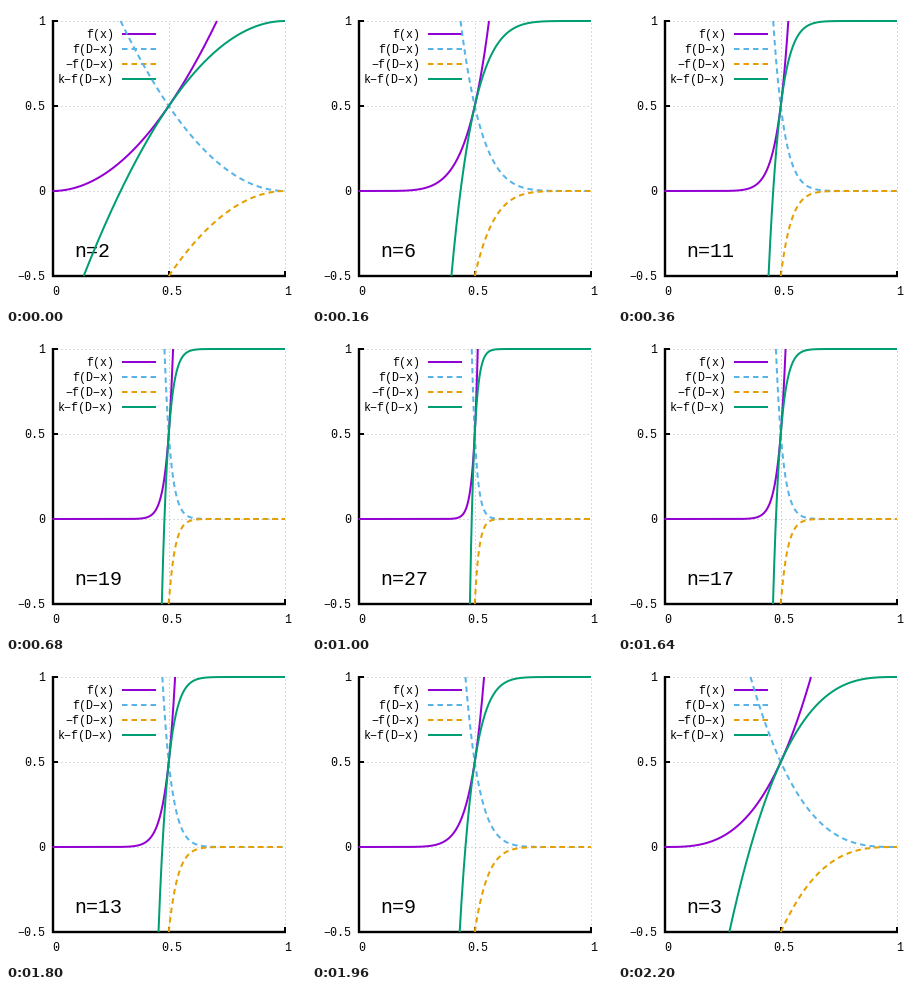
Animation, 300 px wide and 300 px high, one loop 2.24 s. Source, as a matplotlib script:

```python
import numpy as np
import matplotlib.pyplot as plt
from matplotlib.animation import FuncAnimation

SIZE, DPI = 300, 100
PX = 72 / DPI                      # one pixel in points
LEFT, RIGHT, TOP, BOTTOM = 46.5, 279, 15, 270
N_MIN, N_MAX = 2, 30
FRAMES = 2 * (N_MAX - N_MIN)
DASH = (0, (2.75, 2))
MINUS = "\u2212"

plt.rcParams["font.family"] = "Liberation Mono"
fig = plt.figure(figsize=(SIZE / DPI, SIZE / DPI), dpi=DPI, facecolor="white")
page = fig.add_axes([0, 0, 1, 1])
page.set(xlim=(0, SIZE), ylim=(SIZE, 0))
page.axis("off")


def to_px(x, y):
    return LEFT + x * (RIGHT - LEFT), BOTTOM - (y + 0.5) / 1.5 * (BOTTOM - TOP)


def line(xs, ys, color="black", width=2, **kw):
    return page.plot(xs, ys, color=color, lw=width * PX,
                     solid_capstyle="butt", **kw)[0]


def label(x, y, text, ha, size=11.67):
    return page.text(x, y, text.replace("-", MINUS), ha=ha, va="baseline",
                     fontsize=size * PX)


# grid, ticks and tick labels
grid = dict(color="#b4b4b4", width=1, ls=(0, (1, 3)), zorder=0)
for v in (0, 0.5, 1):
    x, _ = to_px(v, 0)
    if v:
        line([x, x], [BOTTOM, TOP], **grid)
    line([x, x], [BOTTOM, BOTTOM - 5.5])
    label(x + 3, 289, f"{v:g}", "center")
for v in (-0.5, 0, 0.5, 1):
    _, y = to_px(0, v)
    if v > -0.5:
        line([LEFT, RIGHT], [y, y], **grid)
    line([LEFT, LEFT + 5.5], [y, y])
    label(39, y + 4, f"{v:g}", "right")
line([LEFT, LEFT, RIGHT + 1], [TOP - 1, BOTTOM, BOTTOM], width=2.4,
     solid_joinstyle="miter")

# curves and their key
styles = [("f(x)", "#9400d3", "-"), ("f(D-x)", "#56b4e9", DASH),
          ("-f(D-x)", "#e69f00", DASH), ("k-f(D-x)", "#009e73", "-")]
curves = []
for i, (name, color, ls) in enumerate(styles):
    y = 28 + 15 * i
    label(108, y + 4, name, "right")
    line([116, 150], [y, y], color, ls=ls)
    curves.append(line([], [], color, ls=ls, zorder=3 + i))
caption = label(68.5, 251, "", "left", 20)


def draw(i):
    n = N_MIN + i if i <= FRAMES // 2 else N_MIN + FRAMES - i

    def f(x):
        return 0.5 * (2 * x) ** n

    # each curve spans only the x range where it stays inside the plot
    end = 0.5 * 2 ** (1 / n)       # f(end) = 1
    cut = 0.5 * 3 ** (1 / n)       # f(cut) = 1.5
    parts = [(0, end, f),
             (1 - end, 1, lambda x: f(1 - x)),
             (0.5, 1, lambda x: -f(1 - x)),
             (1 - cut, 1, lambda x: 1 - f(1 - x))]
    for curve, (a, b, func) in zip(curves, parts):
        x = np.linspace(a, b, 400)
        curve.set_data(*to_px(x, func(x)))
    caption.set_text(f"n={n}")
    return [*curves, caption]


anim = FuncAnimation(fig, draw, frames=FRAMES, interval=40,
                     repeat=True, repeat_delay=0)
plt.show()
```
